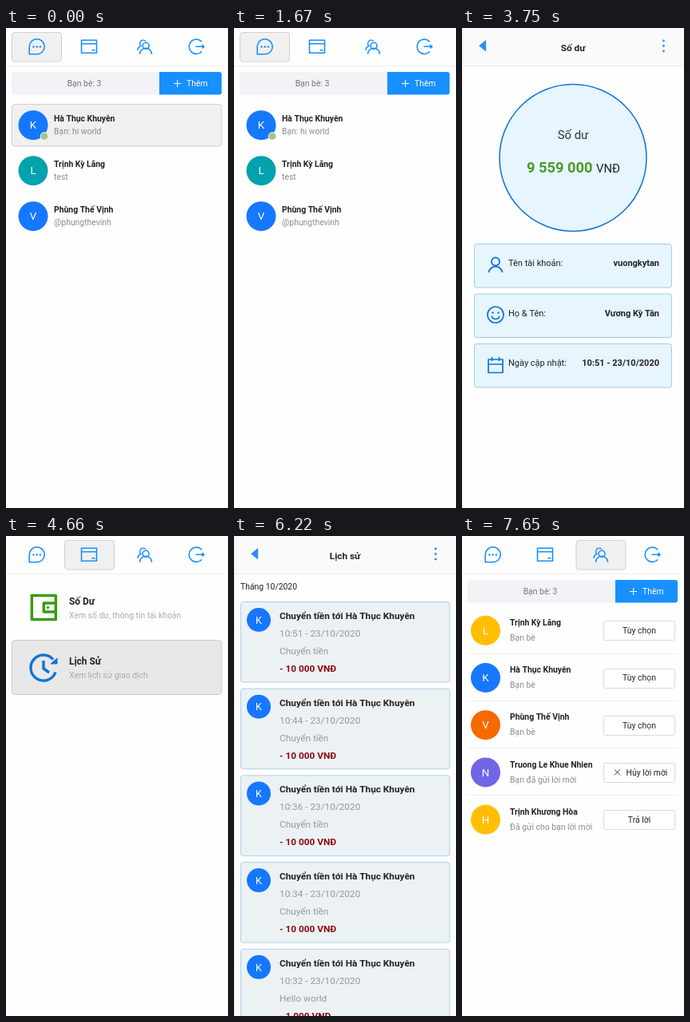
Animation of 278x601 px, one loop 8000 ms. Source, as an HTML page with a canvas:

```html
<!DOCTYPE html>
<html lang="vi">
<head>
<meta charset="utf-8">
<title>Chat</title>
<style>
  html, body { margin: 0; width: 100%; height: 100%; overflow: hidden; background: #fefefe; }
  canvas { display: block; width: 278px; height: 601px; }
</style>
</head>
<body>
<canvas id="stage"></canvas>
<script>
const W = 278, H = 601, LOOP = 8000;
const BLUE = '#1890ff', AVATAR_BLUE = '#1677ff', DEEP_BLUE = '#0f74d6', GREEN = '#3a9c12';
const canvas = document.getElementById('stage');
const ctx = canvas.getContext('2d');
const ratio = window.devicePixelRatio || 1;
canvas.width = W * ratio;
canvas.height = H * ratio;
ctx.scale(ratio, ratio);

function text(str, x, y, { size = 10.4, color = '#222', bold = false, align = 'left' } = {}) {
  ctx.font = `${bold ? 700 : 400} ${size}px Roboto, sans-serif`;
  ctx.fillStyle = color;
  ctx.textAlign = align;
  ctx.fillText(str, x, y);
}

function box(x, y, w, h, radius, fill, stroke) {
  ctx.beginPath();
  ctx.roundRect(x, y, w, h, radius);
  paint(fill, stroke, 1);
}

function paint(fill, stroke, width) {
  if (fill) { ctx.fillStyle = fill; ctx.fill(); }
  if (stroke) { ctx.strokeStyle = stroke; ctx.lineWidth = width; ctx.stroke(); }
}

function disc(x, y, r, fill, stroke, width = 1) {
  ctx.beginPath();
  ctx.arc(x, y, r, 0, Math.PI * 2);
  paint(fill, stroke, width);
}

function path(d, x, y, color, width, fill) {
  ctx.save();
  ctx.translate(x, y);
  const shape = new Path2D(d);
  if (fill) { ctx.fillStyle = color; ctx.fill(shape); }
  ctx.strokeStyle = color;
  ctx.lineWidth = width;
  ctx.lineJoin = 'round';
  ctx.stroke(shape);
  ctx.restore();
}

function avatar(letter, x, y, r, color) {
  disc(x, y, r, color);
  text(letter, x, y + 4.7, { size: r > 16 ? 13.3 : 12.5, color: '#fff', align: 'center' });
}

const hline = (y, color, x = 0, w = W) => { ctx.fillStyle = color; ctx.fillRect(x, y, w, 1); };

// Tab pages

const TAB_BOXES = [7.5, 73.5, 143];

function tabs(active) {
  hline(47, '#f0f0f0');
  box(TAB_BOXES[active], 5.5, 62, 36.5, 3.5, '#f0f0f0', '#d0d0d0');
  path('M-9.5 9.5V0A9.5 9.5 0 1 1 0 9.5Z', 38.7, 23.3, BLUE, 1.6);
  for (const dx of [-4.2, 0, 4.2]) disc(38.7 + dx, 23.5, 1.2, BLUE);
  path('M-9.5 -8H9.5V8H-9.5ZM-9.5 -3.6H9.5M3.5 4.5H7.5', 104, 23.3, BLUE, 1.6);
  path('M-6 9.5A6.2 6.2 0 0 1 9 9.5M-2.4 -1A4 4 0 1 0 5.6 -1A4 4 0 1 0 -2.4 -1' +
       'M-8.6 4.5Q-8.2 .5 -4.6 -.8A4 4 0 1 1 1.5 -6.8', 173.5, 23.3, BLUE, 1.6);
  path('M6.7 -6.2A9.2 9.2 0 1 0 6.7 6.2M-1 0H9M7 -2.2L9.6 0L7 2.2', 238.5, 23.3, BLUE, 1.6);
}

function friendBar() {
  box(7, 55, 185, 28.5, [3, 0, 0, 3], '#f2f2f7');
  text('Bạn bè: 3', 98, 73, { color: '#777', align: 'center' });
  box(192, 55, 78, 28.5, [0, 3, 3, 0], BLUE);
  path('M-4.5 0H4.5M0 -4.5V4.5', 214.7, 69.5, '#fff', 1);
  text('Thêm', 226, 73, { color: '#fff' });
}

const CHATS = [
  ['K', AVATAR_BLUE, 'Hà Thục Khuyên', 'Bạn: hi world'],
  ['L', '#00a2ae', 'Trịnh Kỳ Lãng', 'test'],
  ['V', AVATAR_BLUE, 'Phùng Thế Vịnh', '@phungthevinh'],
];

function chatList(hover) {
  tabs(0);
  friendBar();
  CHATS.forEach(([letter, color, name, note], i) => {
    const y = 95 + i * 57;
    if (i === hover) box(7.5, y + .5, 262.5, 52.5, 3.5, '#f0f0f0', '#d0d0d0');
    avatar(letter, 34, y + 26.7, 18.5, color);
    if (i === 0) disc(48, y + 40.5, 4.8, '#a3c48a', '#f4f4f4');
    text(name, 60, y + 22, { bold: true });
    text(note, 60, y + 38, { color: '#8c8c8c' });
  });
}

function walletMenu(hover) {
  tabs(1);
  const items = [['Số Dư', 'Xem số dư, thông tin tài khoản'], ['Lịch Sử', 'Xem lịch sử giao dịch']];
  items.forEach(([title, note], i) => {
    const y = 55.5 + i * 75;
    if (i === hover) box(7.5, y, 262.5, 68, 3.5, '#e8e8e8', '#cccccc');
    text(title, 79, y + 30.5, { size: 11.9, bold: true });
    text(note, 79, y + 47.5, { color: '#aaa' });
  });
  path('M-15 -15H15V15H-15ZM15 -5.5H0V5.5H15', 47.3, 89.5, GREEN, 3.5);
  disc(52.5, 89.5, 1.7, GREEN);
  path('M12 -10.5A16 16 0 1 0 15 5.5M0 -9V1L7 6', 47, 165, DEEP_BLUE, 3.4);
  path('M17 -12V-5H9Z', 47, 165, DEEP_BLUE, 1, true);
}

const FRIENDS = [
  ['L', '#ffbf00', 'Trịnh Kỳ Lãng', 'Bạn bè', 'Tùy chọn'],
  ['K', AVATAR_BLUE, 'Hà Thục Khuyên', 'Bạn bè', 'Tùy chọn'],
  ['V', '#f56a00', 'Phùng Thế Vịnh', 'Bạn bè', 'Tùy chọn'],
  ['N', '#7265e6', 'Truong Le Khue Nhien', 'Bạn đã gửi lời mời', 'Hủy lời mời'],
  ['H', '#ffbf00', 'Trịnh Khương Hòa', 'Đã gửi cho bạn lời mời', 'Trả lời'],
];

function friends() {
  tabs(2);
  friendBar();
  FRIENDS.forEach(([letter, color, name, note, action], i) => {
    const y = 118.3 + i * 59.2;
    avatar(letter, 29.5, y, 18.5, color);
    text(name, 60, y - 6.3, { bold: true });
    text(note, 60, y + 12.7, { color: '#8c8c8c' });
    box(177.5, Math.round(y) - 11.5, 89, 24, 2, '#fff', '#d9d9d9');
    const cancel = i === 3;
    if (cancel) path('M-3.5 -3.5L3.5 3.5M3.5 -3.5L-3.5 3.5', 194.5, y, '#333', 1);
    text(action, cancel ? 231.5 : 222, y + 3.9, { align: 'center' });
    if (i < 4) hline(Math.round(y + 28.5), '#f0f0f0', 7, 263);
  });
}

// Detail pages

function header(title) {
  ctx.fillStyle = '#fafafa';
  ctx.fillRect(0, 0, W, 47);
  hline(47, '#ececec');
  ctx.fillStyle = '#eeeeee';
  ctx.fillRect(0, 0, 1, H);
  path('M-4 0L4 -6.5V6.5Z', 25.7, 22.3, '#2b8ef0', 1, true);
  for (const y of [16, 22.5, 29]) disc(252.5, y, 1.4, '#2b8ef0');
  text(title, 139, 28.5, { size: 11.8, bold: true, align: 'center' });
}

function bubble(str, y, corners = 7, mine = false) {
  ctx.font = '400 10.4px Roboto, sans-serif';
  const w = ctx.measureText(str).width + 23;
  const x = mine ? 269.5 - w : 9.5;
  box(x, y + .5, w, 32, corners, mine ? '#b3d7ff' : '#f1f1f6', mine ? '#a5c8ee' : '#d2d2d8');
  text(str, x + 11.5, y + 20);
}

function transfer(y) {
  box(73.5, y + .5, 196, 59, 6, '#e3ffd9', '#b9dcae');
  disc(96, y + 19.5, 11, '#078407');
  path('M-4 0L-1 3.2L4.5 -3.2', 96, y + 19.5, '#fff', 1.5);
  const color = '#2c8a1c';
  text('Chuyển', 114.5, y + 24, { color });
  text('10 000', 152, y + 24, { size: 13.2, color });
  text('VNĐ', 195, y + 24, { color });
  text('Chuyển tiền', 114.5, y + 41);
}

function conversation() {
  header('Hà Thục Khuyên');
  [53, 262, 408.5].forEach(transfer);
  bubble('Hello world', 120, [7, 7, 7, 1]);
  bubble('hi world', 154, [1, 7, 7, 1]);
  bubble('test', 188, [1, 7, 7, 1]);
  bubble(':)))', 222, [1, 7, 7, 7]);
  bubble('Hello world', 329, 7, true);
  bubble('Hi world', 368.5);
  bubble('hello world', 475);
  bubble('hi world', 515.5, 7, true);
  ctx.fillStyle = '#fafafa';
  ctx.fillRect(1, 559, W, 42);
  hline(559, '#eeeeee');
  box(8, 565.5, 192.5, 29.5, 15, '#ededed');
  text('Type a message, @name', 16, 584, { size: 9.3, color: '#c2c2c2' });
  disc(218, 579, 9.3, null, GREEN, 1.7);
  text('$', 218, 584.2, { size: 14, color: GREEN, bold: true, align: 'center' });
  path('M-8.5 -8.5L9.5 0L-8.5 8.5L-5.5 0ZM-5.5 0H3', 252.5, 579, BLUE, 1.6);
}

function spinner(title) {
  header(title);
  for (let i = 0; i < 4; i++) {
    const angle = -1.2 + i * Math.PI / 2;
    disc(139 + 9.3 * Math.cos(angle), 322.5 + 9.3 * Math.sin(angle), 4, i ? '#b3dcff' : '#9fd2ff');
  }
}

function balance() {
  header('Số dư');
  disc(139, 162.5, 92, '#e6f5fe', DEEP_BLUE, 1.5);
  text('Số dư', 139, 139, { size: 14.9, color: '#333', align: 'center' });
  text('9 559 000', 81, 181, { size: 18.3, color: '#4c9a2a', bold: true });
  text('VNĐ', 168, 181, { size: 14.8 });
  const rows = [
    ['Tên tài khoản:', 'vuongkytan'],
    ['Họ & Tên:', 'Vương Kỳ Tân'],
    ['Ngày cập nhật:', '10:51 - 23/10/2020'],
  ];
  rows.forEach(([label, value], i) => {
    const y = 270.5 + i * 62.5;
    box(15.5, y, 247, 54.5, 3, '#e6f5fe', '#9bcdf0');
    text(label, 58, y + 27.7, { size: 11 });
    text(value, 247, y + 27.7, { size: 11, bold: true, align: 'right' });
  });
  path('M-8.5 9.5A8.6 8.6 0 0 1 8.5 9.5M-5 -4A5 5 0 1 0 5 -4A5 5 0 1 0 -5 -4', 42, 296.5, DEEP_BLUE, 1.8);
  disc(42, 359, 10, null, DEEP_BLUE, 1.7);
  disc(38.5, 356.5, 1.2, DEEP_BLUE);
  disc(45.5, 356.5, 1.2, DEEP_BLUE);
  path('M-4.8 1.5A4.9 4.9 0 0 0 4.8 1.5', 42, 359, DEEP_BLUE, 1.5);
  path('M-9 -7.5H9V9H-9ZM-9 -1.5H9M-4.5 -10.5V-5.5M4.5 -10.5V-5.5', 42, 422.5, DEEP_BLUE, 1.7);
}

const PAYMENTS = [
  ['10:51'], ['10:44'], ['10:36'], ['10:34'],
  ['10:32', 'Hello world', '1 000'], ['10:30'], ['10:27'], ['10:25'],
];

function history(scroll = 0) {
  text('Tháng 10/2020', 8, 67 - scroll);
  PAYMENTS.forEach(([time, note = 'Chuyển tiền', amount = '10 000'], i) => {
    const y = 82.5 + i * 108.7 - scroll;
    box(8.5, y, 261.5, 100.5, 3, '#ecf1f4', '#abcfec');
    avatar('K', 31, y + 22.5, 15, AVATAR_BLUE);
    text('Chuyển tiền tới Hà Thục Khuyên', 57, y + 21.5, { size: 11.8, bold: true });
    text(`${time} - 23/10/2020`, 57, y + 43.5, { size: 11.8, color: '#969899' });
    text(note, 57, y + 65.5, { size: 11.8, color: '#969899' });
    text(`- ${amount} VNĐ`, 57, y + 87.5, { size: 11.8, color: '#8b0a10', bold: true });
  });
  header('Lịch sử');
}

const TIMELINE = [
  [0, () => chatList(0)],
  [500, conversation],
  [1670, () => chatList()],
  [2450, () => walletMenu(0)],
  [3620, () => spinner('Số dư')],
  [3750, balance],
  [4660, () => walletMenu(1)],
  [5440, () => spinner('Lịch sử')],
  [5570, () => history()],
  [5700, () => history(217)],
  [5960, () => history(109)],
  [6090, () => history(30)],
  [6220, () => history()],
  [6740, () => walletMenu()],
  [7650, friends],
];

const start = performance.now();

function render() {
  const time = Math.max(0, performance.now() - start) % LOOP;
  ctx.fillStyle = '#fefefe';
  ctx.fillRect(0, 0, W, H);
  TIMELINE.findLast(([from]) => from <= time)[1]();
  requestAnimationFrame(render);
}
render();
</script>
</body>
</html>
```
